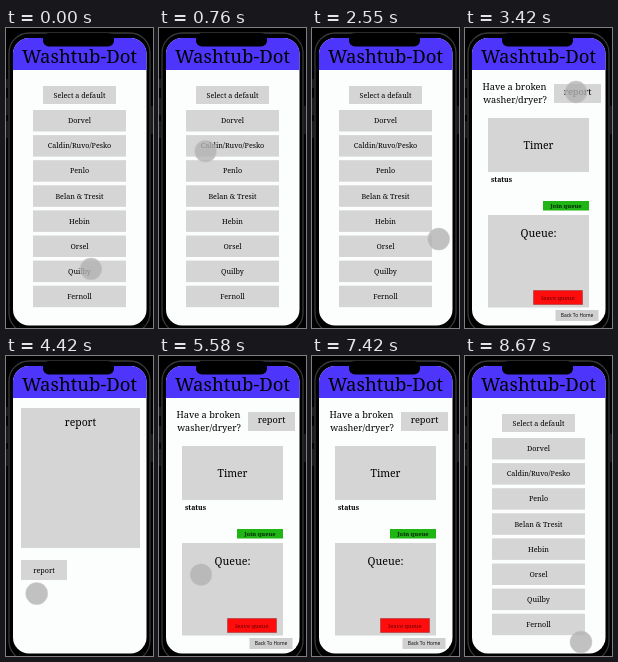
These frames come from a looping animation (147x300 px, 9 s). An HTML page:

```html
<!DOCTYPE html>
<html lang="en">
<head>
<meta charset="utf-8">
<title>Laundry app prototype</title>
<style>
  html, body { margin: 0; width: 100%; height: 100%; overflow: hidden; background: #000; }
  svg { display: block; width: 100%; height: 100%; }
  text { font-family: "Noto Serif", "Liberation Serif", serif; text-anchor: middle; }
  .bold { font-weight: bold; }
  .sans { font-family: "Open Sans", "Liberation Sans", sans-serif; }
</style>
</head>
<body>
<svg viewBox="0 0 147 300" preserveAspectRatio="none">
  <defs><clipPath id="screen"><rect x="7" y="10" width="133.5" height="287.5" rx="16"/></clipPath></defs>
  <rect width="147" height="300"/>
  <rect x="3" y="5" width="141" height="300" rx="20" fill="none" stroke="#383838" stroke-width="1.3"/>
  <path d="M1 51v9M1 70v17M1 93v17M146 78v28" stroke="#333"/>
  <g clip-path="url(#screen)">
    <rect y="10" width="147" height="290" fill="#fcfdfd"/>
    <rect y="10" width="147" height="32" fill="#4d35fb"/>
    <g id="home"></g>
    <g id="timer"></g>
    <g id="report"></g>
  </g>
  <rect x="37" y="5" width="71" height="13.5" rx="6"/>
  <text x="73.5" y="35" font-size="18.6">Washtub-Dot</text>
  <circle id="cursor" r="11" fill="#b2b2b2" fill-opacity=".8" stroke="#ccc" stroke-opacity=".5"/>
</svg>
<script>
const LOOP = 9000, FADE = 120;
const $ = id => document.getElementById(id);
const box = (x, y, w, h, fill = '#d5d5d5', extra = '') =>
  `<rect x="${x}" y="${y}" width="${w}" height="${h}" fill="${fill}" ${extra}/>`;
const label = (s, x, y, size, extra = '') =>
  `<text x="${x}" y="${y}" font-size="${size}" ${extra}>${s}</text>`;
// Box with its text in the middle
const button = (s, x, y, w, h, size, fill, boxExtra, textExtra) =>
  box(x, y, w, h, fill, boxExtra) + label(s, x + w / 2, y + h / 2 + size * .35, size, textExtra);

const halls = ['Dorvel', 'Caldin/Ruvo/Pesko', 'Penlo', 'Belan &amp; Tresit',
  'Hebin', 'Orsel', 'Quilby', 'Fernoll'];

$('home').innerHTML = button('Select a default', 37, 58, 73, 18, 7.2) +
  halls.map((name, i) => button(name, 27, 82 + 25.1 * i, 93, 21.5, 7.2)).join('');

$('timer').innerHTML =
  label('Have a broken', 49.5, 62, 9.2) + label('washer/dryer?', 50, 74.5, 9.2) +
  box(89, 56, 47, 19) + label('report', 112.5, 66.5, 9.2) +
  button('Timer', 23, 90, 101, 54, 10.4) +
  label('status', 36.5, 154, 6.9, 'class="bold"') +
  button('Join queue', 78, 173, 46, 9.5, 5.8, '#1fb514', '', 'class="bold" fill="#052805"') +
  box(23, 187, 101, 92.5) + label('Queue:', 73.5, 209, 10.7) +
  button('leave queue', 68.5, 262.5, 49, 14, 5.8, '#ff0c0c',
    'stroke="#701010" stroke-width=".7" stroke-dasharray="1 1"', 'fill="#600"') +
  button('Back To Home', 90.5, 282, 43, 11, 4.9, '#d0d0d0', '', 'class="sans"');

$('report').innerHTML = box(15, 52, 119, 140) + label('report', 74.5, 70, 10.4) +
  button('report', 15, 204, 46, 20, 7.2);

// Each page dissolves into the next, done at the given time
const pages = [[2820, 'timer'], [3760, 'report'], [5270, 'timer'], [8670, 'home']];

// Pointer moves: start, end, target x and y, sideways and vertical sway, half turns of the sideways sway
const moves = [
  [240, 970, 97, 76, -60, 0, 1],
  [1120, 1610, 72, 97, -8, 20, 1],
  [1880, 2730, 97, 96, -36, 187, 2],
  [2970, 3420, 111, 64, 0, 0, 1],
  [4000, 4240, 30, 240, 30, -100, 1],
  [4390, 4700, 37, 216, 0, 0, 1],
  [5567, 6490, 88, 154, 45, 75, 2],
  [6520, 7420, 92, 314, -38, 0, 2],
  [7700, 8240, 116, 286, -30, -261, 1]
];

const progress = (t, start, end) => Math.min(1, Math.max(0, (t - start) / (end - start)));

function pointerAt(t) {
  let x = 85, y = 241;
  for (const [start, end, toX, toY, swayX, swayY, turns] of moves) {
    const u = progress(t, start, end);
    x += (toX - x) * u + swayX * Math.sin(Math.PI * turns * u);
    y += (toY - y) * u + swayY * Math.sin(Math.PI * u);
  }
  return [x, y];
}

function draw(t) {
  const alpha = { home: 1, timer: 0, report: 0 };
  for (const [end, page] of pages) {
    const k = progress(t, end - FADE, end);
    for (const id in alpha) alpha[id] += ((id === page) - alpha[id]) * k;
  }
  for (const id in alpha) $(id).setAttribute('opacity', alpha[id]);
  const [x, y] = pointerAt(t);
  $('cursor').setAttribute('cx', x);
  $('cursor').setAttribute('cy', y);
}

const began = performance.now();
function tick() {
  draw((performance.now() - began) % LOOP);
  requestAnimationFrame(tick);
}
tick();
</script>
</body>
</html>
```
